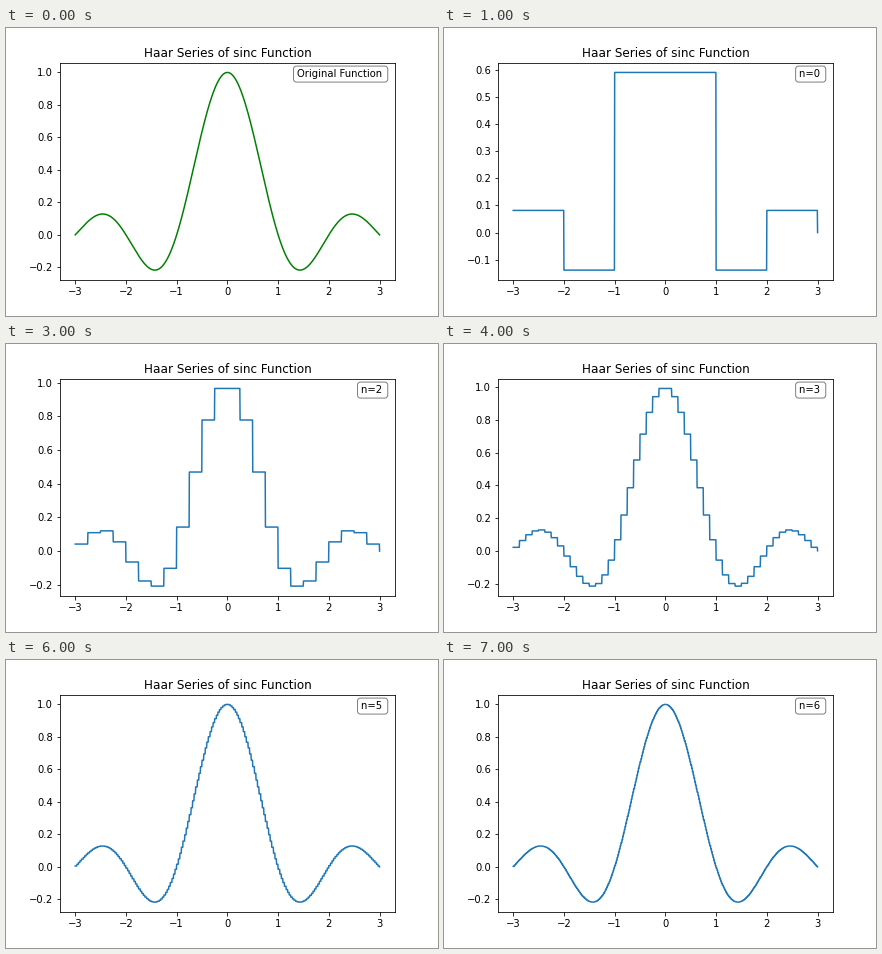
A matplotlib script that plays this animation: 432 by 288 pixels, repeating every 8000 ms.

```python
import numpy as np
import matplotlib.pyplot as plt
from matplotlib.animation import FuncAnimation

START, END, RATE = -3, 3, 200
x = np.arange(START * RATE, END * RATE + 1) / RATE

fig, ax = plt.subplots(figsize=(6, 4), dpi=72)
fig.subplots_adjust(left=0.125, right=0.9, bottom=0.125, top=0.88)
badge = dict(boxstyle="round", facecolor="white", alpha=0.5)


def haar(n):
    """Mean of sinc over each dyadic cell of width 2**-n, zero from END on."""
    width = 0.5 ** n
    left = np.floor(x / width) * width
    samples = left[:, None] + width * (np.arange(64) + 0.5) / 64
    return np.where(x < END, np.sinc(samples).mean(axis=1), 0)


def draw(i):
    ax.clear()
    if i == 0:
        ax.plot(x, np.sinc(x), color="green")
        label = "Original Function "
    else:
        ax.plot(x, haar(i - 1), color="C0")
        label = f"n={i - 1} "
    ax.set_title("Haar Series of sinc Function")
    ax.text(0.97, 0.97, label, transform=ax.transAxes, ha="right", va="top",
            fontsize=10, bbox=badge)


anim = FuncAnimation(fig, draw, frames=8, interval=1000, init_func=lambda: None,
                     repeat=True, repeat_delay=0)
plt.show()
```
